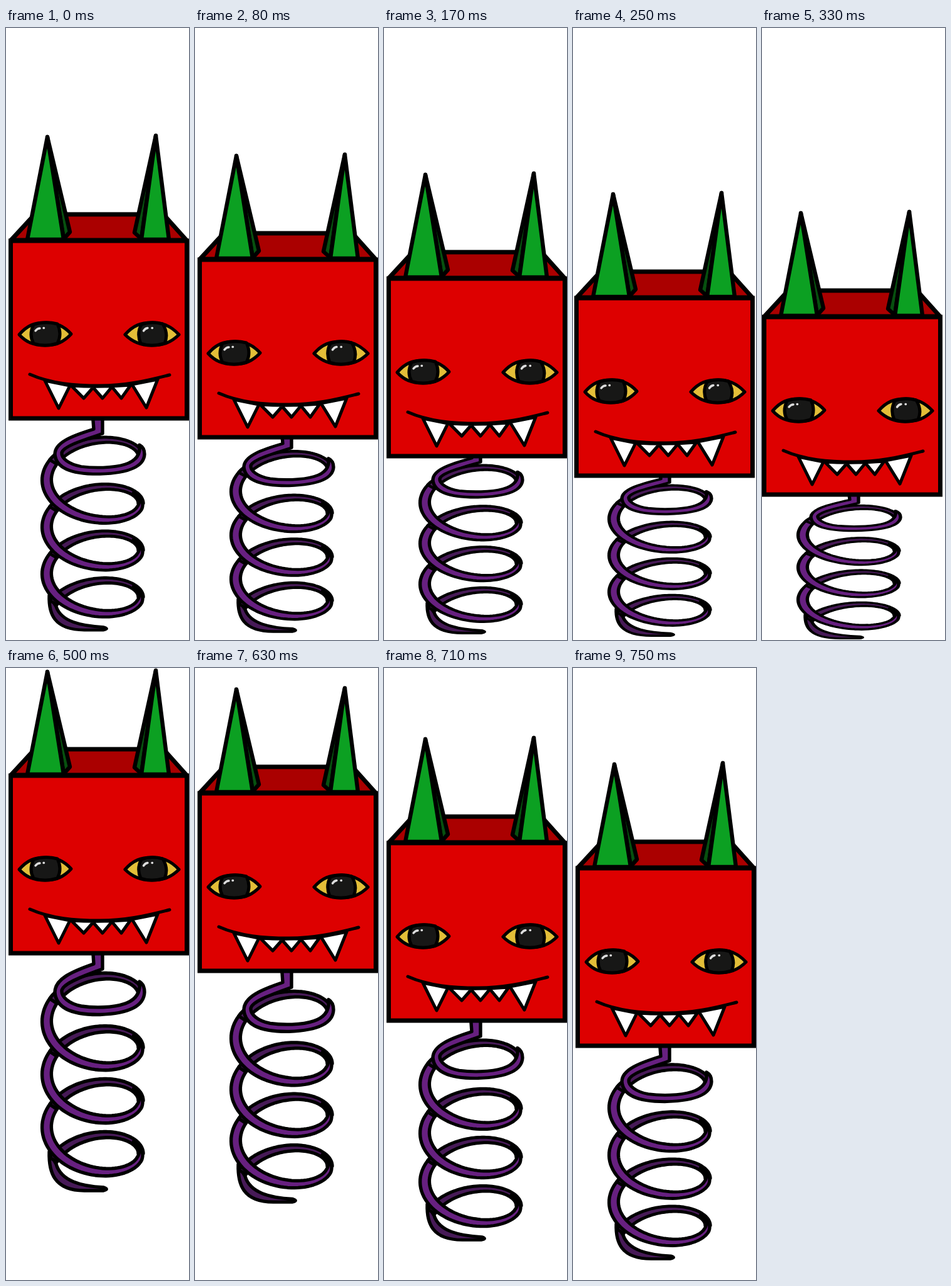
An HTML page that plays this animation: 292x972 px, repeating every 0.79 s.

```html
<!DOCTYPE html>
<html lang="en">
<head>
<meta charset="utf-8">
<title>Jack-in-the-box</title>
<style>
  html, body { margin: 0; width: 100%; height: 100%; overflow: hidden; background: #fff; }
  svg { display: block; width: 292px; height: 972px; }
  svg * { stroke-linejoin: round; stroke-linecap: round; }
  #box { stroke: #000; stroke-width: 7; }
  #spring { stroke: #000; stroke-width: 5.4; }
  .thin { stroke-width: 5; }
  .red { fill: #d00; }
  .maroon { fill: #a00; }
  .green { fill: #0ca022; }
  .moss { fill: #07500f; }
  .white { fill: #fff; }
  .yellow { fill: #e3be38; }
  .ink { fill: #171716; }
  .purple { fill: #672080; }
  .plum { fill: #471a57; }
  .line { fill: none; }
  .shine { fill: none; stroke: #ddd; stroke-width: 3.4; }
</style>
</head>
<body>
<svg viewBox="0 0 292 972">
  <g id="spring"></g>
  <g id="box">
    <path class="maroon" d="M8 170L46 129H251L288 170Z"/>
    <g style="stroke-width:6.4">
      <path class="moss" d="M66 6L102 157L92 168Z"/>
      <path class="green" d="M66 6L34 169H92Z"/>
      <path class="moss" d="M239 4L205 158L216 168Z"/>
      <path class="green" d="M239 4L216 169H260Z"/>
    </g>
    <path class="red" style="stroke-linejoin:miter" d="M7.500 171H288.500V453H7.500Z"/>
    <g class="thin">
      <path class="yellow" d="M21 320C34 305 46 301 62 301C80 301 92 306 104 319C92 332 80 337 62 337C44 337 32 332 21 320Z"/>
      <path class="ink" d="M44 304Q62 298 82 303Q90 319 82 334Q62 340 44 334Q36 320 44 304Z"/>
      <path class="shine" d="M47 314Q50 310 54 310M60 309.500h.5"/>
      <path class="yellow" d="M190 320C203 305 216 301 232 301C250 301 263 306 276 320C263 333 250 337 232 337C215 337 202 332 190 320Z"/>
      <path class="ink" d="M216 304Q232 298 250 303Q260 319 253 334Q232 340 215 334Q208 319 216 304Z"/>
      <path class="shine" d="M219.500 314Q222 310 226 309.500M233 309.500h.5"/>
      <path class="white" d="M62 393L84 437L102 401Z"/>
      <path class="white" d="M104 401L124 421L139 404L154 421L169 403L184 421L199 400Q150 404 104 401Z"/>
      <path class="white" d="M201 399L224 436L242 391Z"/>
      <path class="line" d="M38 383C72 398 110 401 150 401C190 401 222 394 261 384"/>
    </g>
  </g>
</svg>
<script>
const box = document.getElementById('box');
const spring = document.getElementById('spring');
const { PI, sin, cos, min, max, round, hypot } = Math;

function addPath(cls, d) {
  const p = document.createElementNS('http://www.w3.org/2000/svg', 'path');
  p.setAttribute('class', cls);
  p.setAttribute('d', d);
  spring.append(p);
}

// Helix seen from the side; angle 0 is the right end of a coil
const TOP = 519, PITCH = 84, COILS = 4;
const helix = (n, a) => [140 + 75 * cos(a), TOP + PITCH * (n + a / (2 * PI)) - 49 * sin(a)];

// Band along the helix, widest on the left, with an optional pointed end
function band(cls, n, from, to, taper) {
  const left = [], right = [], steps = 60;
  for (let i = 0; i <= steps; i++) {
    const a = from + (to - from) * i / steps;
    const [x, y] = helix(n, a);
    const [px, py] = helix(n, a - .01), [qx, qy] = helix(n, a + .01);
    const w = (5.7 - 1.7 * cos(a) - .6 * sin(a)) * (taper ? min(1, (to - a) / taper) : 1);
    const k = w / hypot(qx - px, qy - py);
    const dx = (py - qy) * k, dy = (qx - px) * k;
    left.push([(x + dx).toFixed(1), (y + dy).toFixed(1)]);
    right.unshift([(x - dx).toFixed(1), (y - dy).toFixed(1)]);
  }
  addPath(cls, 'M' + left.concat(right).join('L') + 'Z');
}

// Lowest coil first, so upper coils overlap it
addPath('plum', 'M69 768C68 800 76 830 125 830H155Q165 828 156 825C120 823 88 815 80 788Z');
for (let n = COILS - 1; n >= 0; n--) {
  band('plum', n, 0, .83 * PI);
  if (n) band('purple', n, -1.2 * PI, .18 * PI, .8);
}
// Topmost turn bends up into the box
addPath('purple', 'M138 440L140 470C105 482 78 494 78 515C80 545 115 551 150 550.500' +
  'C190 549 220 540 221 515C221 506 218 501 213 498C215 515 207 527 190 533' +
  'C170 540 140 540 120 537C100 533 88 522 89 512C92 500 125 489 154 478V440Z');

const LOOP = 790, TICKS = 19, COIL_Y = 515;
const tickStart = i => round(i * 100 / 24) * 10;
const linear = t => t;
const easeOut = t => t + .917 * (t - t * t);

const KEYS = [
  { tick: 0, y: 167, coil: 677, stretch: .886 },
  { tick: 4, y: 227, coil: 718, stretch: .771 },
  { tick: 8, y: 288, coil: 777, stretch: .611, ease: easeOut },
  { tick: 12, y: 0, coil: 515, stretch: 1 },
  { tick: 14, y: 0, coil: 515, stretch: 1 },
  { tick: 15, y: 28, coil: 543, stretch: .969 },
  { tick: 18, y: 147, coil: 657, stretch: .893 },
  { tick: 19, y: 167, coil: 677, stretch: .886 }
];

function pose(tick) {
  const i = KEYS.findIndex(k => k.tick > tick);
  const a = KEYS[i - 1], b = KEYS[i];
  const f = (a.ease || linear)((tick - a.tick) / (b.tick - a.tick));
  const mix = key => a[key] + (b[key] - a[key]) * f;
  return { y: mix('y'), coil: mix('coil'), stretch: mix('stretch') };
}

function draw(ms) {
  const t = ms % LOOP;
  let tick = TICKS - 1;
  while (tick > 0 && tickStart(tick) > t) tick--;
  const { y, coil, stretch } = pose(tick);
  // The box drifts left only when squashed deepest
  const x = -4 * max(0, (y - 227) / 61);
  box.setAttribute('transform', `translate(${round(x)} ${round(y)})`);
  spring.setAttribute('transform', `translate(0 ${coil - COIL_Y * stretch}) scale(1 ${stretch})`);
}

const start = performance.now();
function loop() {
  draw(performance.now() - start);
  requestAnimationFrame(loop);
}
loop();
</script>
</body>
</html>
```
